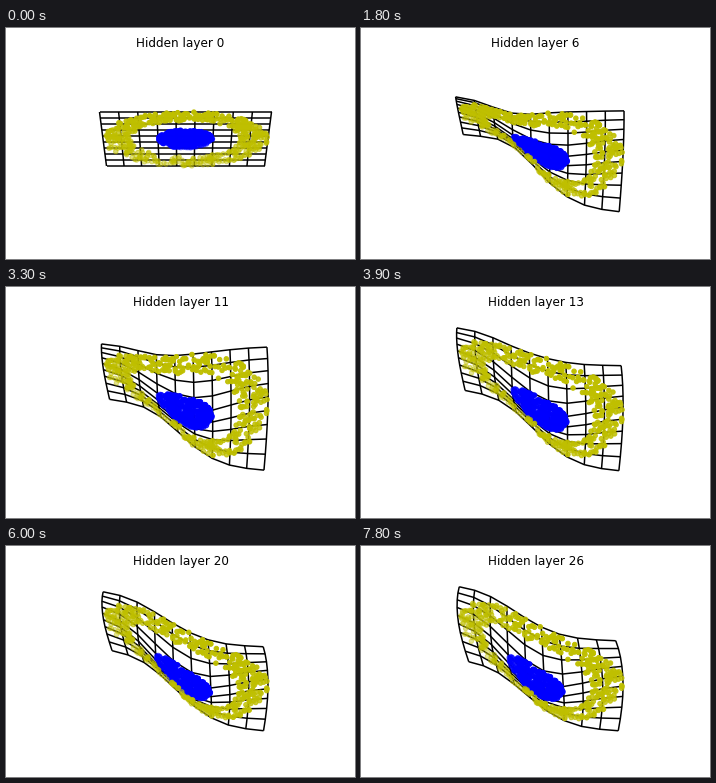
Write a matplotlib script that moves like this. It is 349 px wide and 231 px high and loops after 8 s.

```python
import numpy as np
import matplotlib.pyplot as plt
from matplotlib.animation import FuncAnimation
from matplotlib.collections import LineCollection

W, H, DPI = 349, 231, 72
INTERVAL, FRAMES, TICKS_PER_LAYER = 100, 80, 3
LAST_LAYER = 26
HALF = 1.5                      # half width of the sheet

# Layer, then corner heights: far left, far right, near left, near right.
POSES = np.array([
    (0, 84, 84, 138, 138),
    (1, 65, 110, 97, 184),
    (4, 65, 110, 97, 184),
    (9, 72, 41, 121, 182),
    (13, 40, 78, 103, 183),
    (16, 61, 97, 98, 184),
    (20, 45, 100, 104, 184),
    (26, 40, 94, 115, 184),
])


def mix(a, b, share):
    return a + (b - a) * share


def height(u, v, layer):
    """Screen y: a warped panel between four corners, with a pit and a waist."""
    far_l, far_r, near_l, near_r = (
        np.interp(layer, POSES[:, 0], column) for column in POSES.T[1:])
    across = (u + HALF) / (2 * HALF)
    across = across - 0.11 * np.sin(2 * np.pi * across)
    panel = mix(mix(near_l, near_r, across), mix(far_l, far_r, across),
                (v + HALF) / (2 * HALF))

    arch = 7 * np.tanh(layer) * (1 - (v / HALF) ** 2)
    pit = 38 * (1 - np.exp(-layer / 6)) * np.exp(-u ** 2 / 0.9 - v ** 2 / 1.6)
    waist = 7 * layer * np.exp(-layer / 4)
    waist = waist * v / HALF * np.exp(-((u + 0.5) / 0.6) ** 2)
    return panel - arch + pit + waist


def project(u, v, layer):
    """Screen positions and depth of points on the sheet."""
    age = layer / LAST_LAYER
    a, b = u / HALF, v / HALF
    half_width = 82.5 - 6 * age * b ** 2 + 3.5 * (1 - 0.5 * age) * b
    x = 179.5 + a * half_width - 3 * age * b - 5 * age ** 3 * (1 - a ** 2)
    y = height(u, v, layer)
    lift = 111 - 18 * v - y
    return np.stack([x, y], axis=-1), 0.001 * lift - 0.0283 * v


def ring(rng, count, inner, outer):
    radius = np.sqrt(rng.uniform(inner ** 2, outer ** 2, count))
    angle = rng.uniform(0, 2 * np.pi, count)
    return radius * np.cos(angle), radius * np.sin(angle)


rng = np.random.default_rng(4)
steps = np.linspace(-HALF, HALF, 10)
grid_u, grid_v = np.meshgrid(steps, steps)

fig = plt.figure(figsize=((W + 1e-6) / DPI, (H + 1e-6) / DPI), dpi=DPI,
                 facecolor="white")
ax = fig.add_axes([0, 0, 1, 1])
ax.set(xlim=(0, W), ylim=(H, 0))
ax.axis("off")

title = ax.text(W / 2, 19, "", ha="center", va="baseline",
                fontsize=12, family="DejaVu Sans")
wires = LineCollection([], colors="black", linewidths=1.5, zorder=1)
ax.add_collection(wires)

clouds = []
for order, (points, color) in enumerate([
        (ring(rng, 350, 0, 0.5), (0, 0, 1)),
        (ring(rng, 440, 1.0, 1.5), (0.75, 0.75, 0))]):
    dots = ax.scatter([], [], s=20, linewidths=1, zorder=2 + order)
    clouds.append((points, color, dots))


def draw(frame):
    layer = frame // TICKS_PER_LAYER
    title.set_text(f"Hidden layer {layer}")

    nodes, _ = project(grid_u, grid_v, layer)
    wires.set_segments(list(nodes) + list(nodes.transpose(1, 0, 2)))

    for points, color, dots in clouds:
        spots, depth = project(*points, layer)
        far_first = np.argsort(-depth)
        fade = (depth - depth.min()) / np.ptp(depth)
        rgba = np.column_stack([np.tile(color, (len(fade), 1)), 1 - 0.6 * fade])
        dots.set_offsets(spots[far_first])
        dots.set_facecolor(rgba[far_first])
        dots.set_edgecolor(rgba[far_first])
    return [title, wires] + [dots for _, _, dots in clouds]


anim = FuncAnimation(fig, draw, frames=FRAMES, interval=INTERVAL,
                     repeat=True, repeat_delay=0, blit=False)
plt.show()
```
